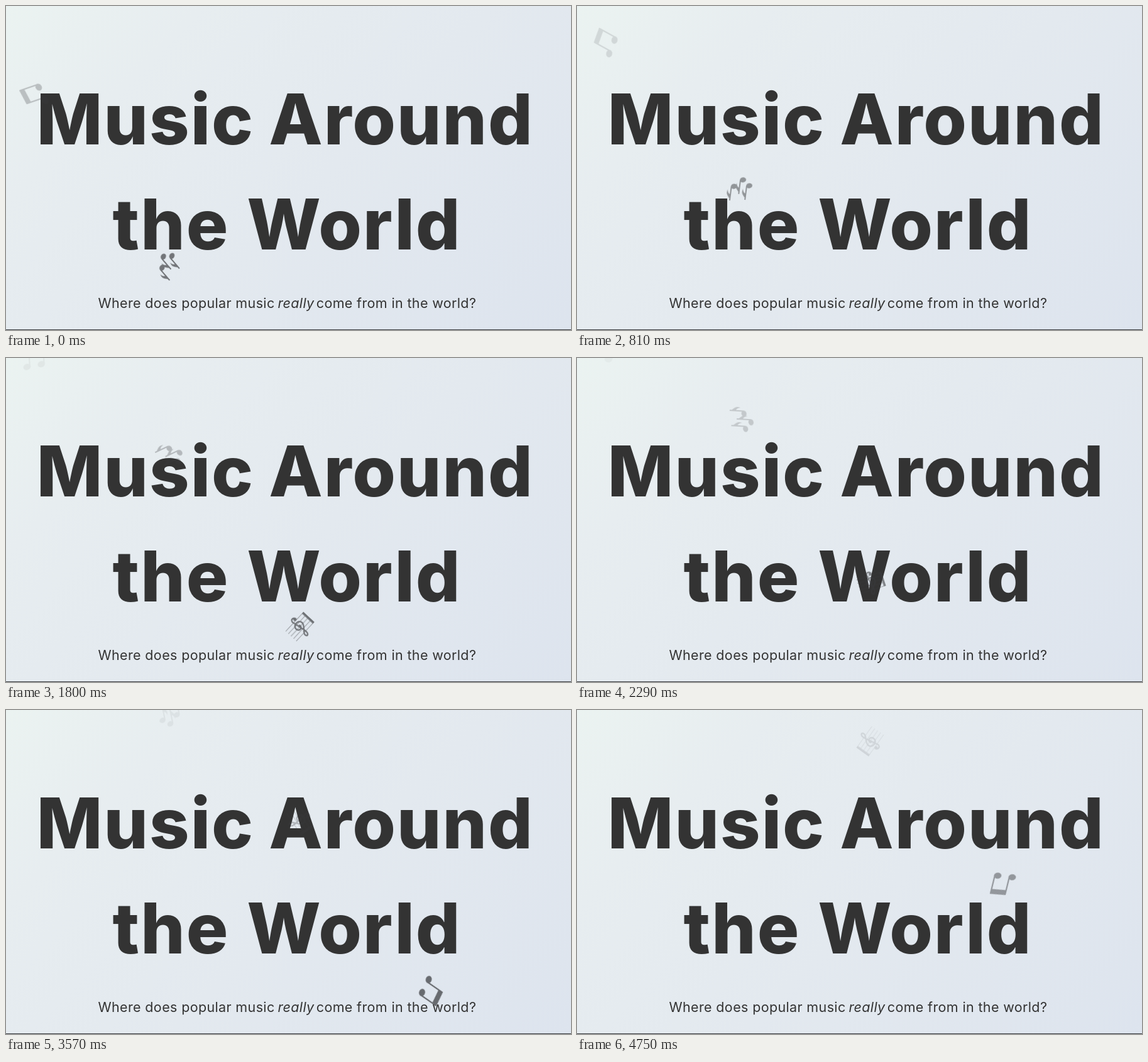
These frames come from a looping animation (899x515 px, 4.85 s). An HTML page:

```html
<!DOCTYPE html>
<html lang="en">
<head>
<meta charset="utf-8">
<title>Music Around the World</title>
<style>
  html, body { margin: 0; width: 100%; height: 100%; overflow: hidden; }
  body { background: linear-gradient(135deg, #ebf3f1 0%, #e7edf0 22%, #e3e9ef 55%, #dde4ee 100%); }
  svg { display: block; width: 899px; height: 515px; }
  text { fill: #333; text-anchor: middle; font-family: Poppins, Inter, "Open Sans", sans-serif; }
  .title { font-size: 111px; font-weight: 840; letter-spacing: .018em; font-optical-sizing: none; }
  .sub { font-size: 21.5px; letter-spacing: .36px; }
  .really { font-style: italic; }

  .note {
    color: #37383b;
    animation: rise 7640ms ease-in-out backwards paused, spin 7640ms linear backwards paused;
  }
  @keyframes rise {
    from { translate: 0 0; opacity: 1; }
    to { translate: 0 -658px; opacity: .04; }
  }
  @keyframes spin {
    from { rotate: -45deg; }
    to { rotate: 402deg; }
  }
  .fill { fill: currentColor; }
  .line { fill: none; stroke: currentColor; }
</style>
</head>
<body>
<svg viewBox="0 0 899 515">
  <defs>
    <g id="pair">
      <path class="fill" d="M-9-16L16-20V-12L-9-8Z"/>
      <path class="line" stroke-width="2.2" d="M-8-14V14M15-18V11"/>
      <ellipse class="fill" rx="6" ry="4.7" transform="translate(-12.5 14) rotate(-20)"/>
      <ellipse class="fill" rx="6" ry="4.7" transform="translate(10.5 11) rotate(-20)"/>
    </g>
    <g id="single">
      <ellipse class="fill" rx="5" ry="4" transform="rotate(-20)"/>
      <path class="line" stroke-width="2" d="M4-1V-23"/>
      <path class="fill" d="M3-23.5C5-17 13-15 9-6C9-11 6-13 3-14Z"/>
    </g>
    <g id="trio">
      <use href="#single" x="-13" y="9"/>
      <use href="#single" x="-2" y="17"/>
      <use href="#single" x="11" y="5"/>
    </g>
    <g id="staff">
      <path class="line" stroke-width="1" opacity=".65"
        d="M-21-11.4H20M-21-5.7H20M-21 0H20M-21 5.7H20M-21 11.4H20"/>
      <path class="fill" d="M-22-12h3.6v24h-3.6z"/>
      <path class="line" stroke-width="2.2" stroke-linecap="round"
        d="M-5 13c-1 5 7 6 7 0L-2-10c-1-9 5-10 5-5 0 6-11 9-11 17 0 8 15 8 14-1-1-7-10-5-8 1"/>
      <circle class="fill" cx="-4" cy="13.5" r="2.6"/>
    </g>
  </defs>

  <g class="title">
    <text x="222" y="220">Music</text>
    <text x="629" y="220">Around</text>
    <text x="262.5" y="387">the</text>
    <text x="554" y="387">World</text>
  </g>
  <g class="sub">
    <text x="287" y="479.5">Where does popular music</text>
    <text class="really" x="461.5" y="479.5">really</text>
    <text x="621" y="479.5">come from in the world?</text>
  </g>

  <g transform="translate(45 644)"><use class="note" href="#pair"/></g>
  <g transform="translate(260 644)"><use class="note" href="#trio"/></g>
  <g transform="translate(467 644)"><use class="note" href="#staff"/></g>
  <g transform="translate(677 644)"><use class="note" href="#pair"/></g>

  <rect y="514" width="899" height="1" fill="#3a3c40"/>
</svg>
<script>
  const LOOP = 4850, FIRST = 130, STEP = 98.3, EARLY = 11;
  const HEAD_START = 5060, STAGGER = 1910;
  const notes = [...document.querySelectorAll('.note')].map(n => n.getAnimations());

  // Motion advances in even steps after a slightly longer first hold.
  const stepped = t => {
    const k = Math.floor((t - FIRST + EARLY) / STEP);
    return k < 0 ? 0 : FIRST + k * STEP;
  };

  function draw() {
    const t = stepped(performance.now() % LOOP);
    notes.forEach((anims, i) => {
      for (const anim of anims) anim.currentTime = t + HEAD_START - i * STAGGER;
    });
    requestAnimationFrame(draw);
  }
  draw();
</script>
</body>
</html>
```
